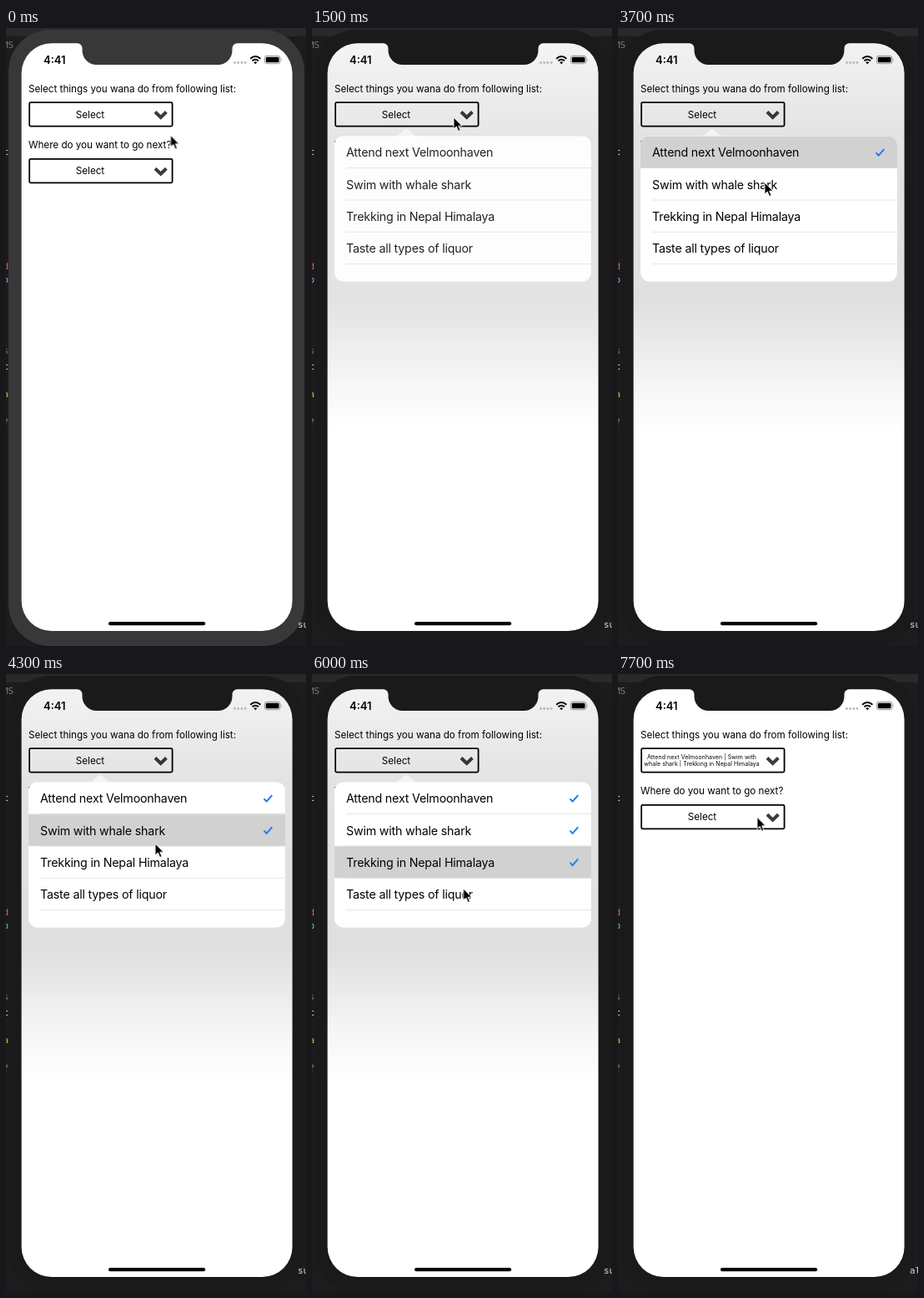
These frames come from a looping animation (360 px wide and 740 px high, 8 s). An HTML page:

```html
<!DOCTYPE html>
<html lang="en">
<head>
<meta charset="utf-8">
<title>Dropdown selection</title>
<style>
html, body { margin: 0; width: 100%; height: 100%; overflow: hidden; background: #1c1c1c; }
svg { display: block; width: 360px; height: 740px; font-family: Inter, "Noto Sans", sans-serif; }
.label { font-size: 11.65px; }
.mid { text-anchor: middle; }
.tiny { font-size: 6.95px; letter-spacing: .09px; text-anchor: middle; }
.row { font-size: 14.25px; letter-spacing: -.19px; }
.time { font-size: 13px; font-weight: 600; }
.code { font: 11px "DejaVu Sans Mono", monospace; }
.box { fill: none; stroke: #000; stroke-width: 1.8; }
.tick { fill: none; stroke: #1976ee; stroke-width: 1.9; }
.hl { fill: #d1d1d1; }

/* one loop is 8 s, so 1.25% is 100 ms */
.anim { animation: 8s linear infinite; }
.cut { animation: 8s step-end infinite; }
#body { animation-name: focus; }
#shade { animation-name: shade; }
#pop { animation-name: pop; }
#content { animation-name: content; }
#cursor { animation-name: move; }
#before { animation-name: before; }
#after { animation-name: after; }
#edgeA { animation-name: before; }
#edgeB { animation-name: after; }
#hl1 { animation-name: hl1; }
#hl2 { animation-name: hl2; }
#hl3 { animation-name: hl3; }
#tick1 { animation-name: tick1; }
#tick2 { animation-name: tick2; }
#tick3 { animation-name: tick3; }

@keyframes focus { 0% { fill: #383838 } 12.5%, 100% { fill: #1a1a1a } }
@keyframes before { 0% { opacity: 1 } 87.5%, 100% { opacity: 0 } }
@keyframes after { 0% { opacity: 0 } 87.5%, 100% { opacity: 1 } }
@keyframes hl1 { 0% { opacity: 0 } 33.75% { opacity: 1 } 48.75%, 100% { opacity: 0 } }
@keyframes hl2 { 0% { opacity: 0 } 48.75% { opacity: 1 } 72.5%, 100% { opacity: 0 } }
@keyframes hl3 { 0% { opacity: 0 } 72.5%, 100% { opacity: 1 } }
@keyframes tick1 { 0% { opacity: 0 } 35%, 100% { opacity: 1 } }
@keyframes tick2 { 0% { opacity: 0 } 50%, 100% { opacity: 1 } }
@keyframes tick3 { 0% { opacity: 0 } 72.5%, 100% { opacity: 1 } }
@keyframes shade {
  0%, 18.74% { opacity: 0 } 18.75% { opacity: .9 } 21.25%, 83.74% { opacity: 1 }
  85% { opacity: .6 } 87.5%, 100% { opacity: 0 }
}
@keyframes pop {
  0%, 18.74% { opacity: 0 } 18.75%, 85% { opacity: 1 } 87.5%, 100% { opacity: 0 }
}
@keyframes content {
  0%, 18.75% { opacity: .86 } 21.25%, 83.74% { opacity: 1 }
  85% { opacity: .84 } 87.5%, 100% { opacity: .5 }
}
@keyframes move {
  0%, 1.25% { transform: translate(197.5px, 128.5px) }
  6.25% { transform: translate(181px, 114px) }
  11.25%, 25% { transform: translate(170px, 107px) }
  27% { transform: translate(178px, 125px) }
  28.75%, 35% { transform: translate(172.5px, 141.5px) }
  40%, 43.75% { transform: translate(175px, 168.5px) }
  46.25%, 48.75% { transform: translate(176px, 185px) }
  53.75% { transform: translate(179px, 203px) }
  58.75%, 61.25% { transform: translate(180px, 220px) }
  65% { transform: translate(181px, 252px) }
  68.75%, 73.75% { transform: translate(178.5px, 229.5px) }
  77.5%, 86.25% { transform: translate(187.5px, 311px) }
  93.75% { transform: translate(167px, 174px) }
  95%, 100% { transform: translate(167px, 171.5px) }
}
</style>
</head>
<body>
<svg viewBox="0 0 360 740">
  <defs>
    <linearGradient id="dim" x1="0" y1="18" x2="0" y2="485" gradientUnits="userSpaceOnUse">
      <stop offset="0" stop-opacity=".05"/>
      <stop offset=".24" stop-opacity=".11"/>
      <stop offset=".66" stop-opacity=".125"/>
      <stop offset=".74" stop-opacity=".095"/>
      <stop offset=".87" stop-opacity=".04"/>
      <stop offset="1" stop-opacity="0"/>
    </linearGradient>
    <path id="screen" d="M54.600 18.200H85.500A6 6 0 0 1 91.500 24.200V27A17 17 0 0 0 108.500 44H254.500A17 17 0 0 0 271.500 27V24.200A6 6 0 0 1 277.500 18.200H307.600A36 36 0 0 1 343.600 54.200V686A36 36 0 0 1 307.600 722H54.600A36 36 0 0 1 18.600 686V54.200A36 36 0 0 1 54.600 18.200Z"/>
    <clipPath id="card"><rect x="27" y="129.500" width="308" height="174" rx="11"/></clipPath>
    <g id="select">
      <rect class="box" x="28.100" y="89.100" width="171.500" height="28.500" rx="1.500"/>
      <path d="M179 100.500L185.700 107L192.400 100.500" fill="none" stroke="#3b3b3b" stroke-width="4"/>
    </g>
    <path id="tick" class="tick" d="M309.500 149.400L312.700 152.600L319.300 145.200"/>
    <rect id="band" class="hl" x="27" y="129.500" width="308" height="38.200"/>
  </defs>

  <!-- editor behind the phone -->
  <rect width="360" height="740" fill="#1c1c1c"/>
  <rect width="360" height="10" fill="#292929"/>
  <g class="code">
    <text x="-4" y="24" fill="#777">MS</text>
    <text x="-3.500" y="152" fill="#ddd">c</text>
    <text x="-3.500" y="289" fill="#d0607a">d</text>
    <text x="-3.500" y="305" fill="#7fc4cf">o</text>
    <text x="-3.500" y="390" fill="#777">s</text>
    <text x="-3.500" y="409" fill="#ddd">c</text>
    <text x="-3.500" y="442" fill="#a3c25a">a</text>
    <text x="-3.500" y="476" fill="#7fb45a">f</text>
  </g>

  <!-- phone -->
  <rect id="body" class="cut" x="3" y="2" width="355" height="738" rx="50"/>
  <g class="code" fill="#ddd" font-weight="bold">
    <text id="edgeA" class="cut" x="350" y="718">su</text>
    <text id="edgeB" class="cut" x="350" y="718">al</text>
  </g>
  <use href="#screen" fill="#fff"/>

  <!-- form -->
  <text class="label" x="27" y="76.500">Select things you wana do from following list:</text>
  <use href="#select"/>
  <text id="before" class="label mid cut" x="101" y="107.500">Select</text>
  <g id="after" class="tiny cut">
    <text x="100.500" y="102.300">Attend next Velmoonhaven | Swim with</text>
    <text x="100.500" y="110">whale shark | Trekking in Nepal Himalaya</text>
  </g>
  <text class="label" x="27" y="144.300">Where do you want to go next?</text>
  <use href="#select" y="67.700"/>
  <text class="label mid" x="101" y="175.300">Select</text>

  <use id="shade" class="anim" href="#screen" fill="url(#dim)"/>

  <!-- popover -->
  <g id="pop" class="anim">
    <path d="M99 130Q104 129 108.500 123.500Q113 118.500 117.500 123.500Q122 129 127 130Z" fill="#f4f4f4"/>
    <rect x="27" y="129.500" width="308" height="174" rx="11" fill="#eee"/>
    <g id="content" class="anim" clip-path="url(#card)">
      <rect x="27" y="129" width="308" height="175" fill="#fff"/>
      <path d="M41 167.500H335M41 206H335M41 244.300H335M41 282.500H335" stroke="#dfdfdf" stroke-width=".8"/>
      <use id="hl1" class="cut" href="#band"/>
      <use id="hl2" class="cut" href="#band" y="38.300"/>
      <use id="hl3" class="cut" href="#band" y="76.600"/>
      <g class="row">
        <text x="41" y="154.300">Attend next Velmoonhaven</text>
        <text x="41" y="192.500">Swim with whale shark</text>
        <text x="41" y="230.700">Trekking in Nepal Himalaya</text>
        <text x="41" y="268.900">Taste all types of liquor</text>
      </g>
      <use id="tick1" class="cut" href="#tick"/>
      <use id="tick2" class="cut" href="#tick" y="38.200"/>
      <use id="tick3" class="cut" href="#tick" y="76.400"/>
    </g>
  </g>

  <!-- status bar and home indicator -->
  <text class="time" x="45" y="42.500">4:41</text>
  <g fill="#b8b8b8">
    <circle cx="274.500" cy="41.500" r="1.400"/>
    <circle cx="278.700" cy="41.500" r="1.400"/>
    <circle cx="282.900" cy="41.500" r="1.400"/>
    <circle cx="287.100" cy="41.500" r="1.400"/>
  </g>
  <g fill="none" stroke="#000" stroke-width="1.900">
    <path d="M293.200 36.800Q299.300 31.400 305.400 36.800"/>
    <path d="M295.500 39.300Q299.300 36 303.100 39.300"/>
  </g>
  <path d="M297.200 41Q299.300 39.300 301.400 41L299.300 43.200Z"/>
  <rect x="310.400" y="33.300" width="18.600" height="9.400" rx="2.600" fill="none" stroke="#8c8c8c" stroke-width=".9"/>
  <rect x="311.800" y="34.700" width="15.800" height="6.600" rx="1.400"/>
  <path d="M330 36.500Q331.600 38 330 39.500Z" fill="#8c8c8c"/>
  <rect x="123" y="711" width="116.200" height="4.300" rx="2.150"/>

  <g id="cursor" class="anim">
    <path d="M0 0V14L3.300 11L5.700 16.500L8 15.500L5.700 10.200H10Z" stroke="#fff" stroke-width=".9" stroke-linejoin="round"/>
  </g>
</svg>
</body>
</html>
```
